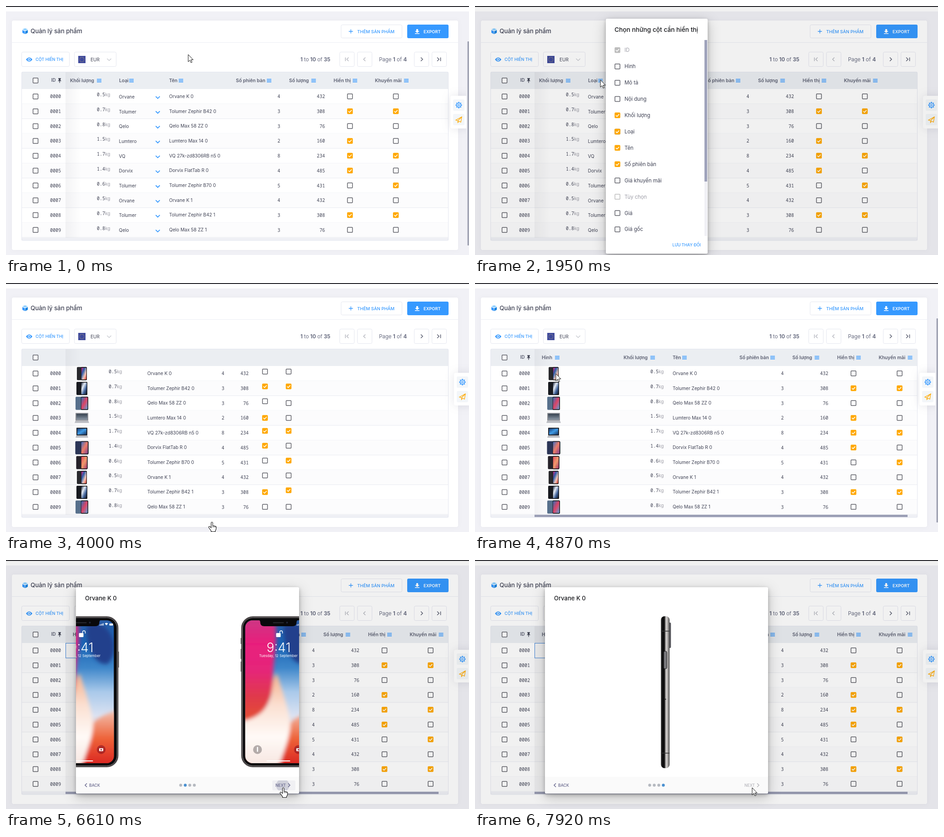
An HTML page that plays this animation: 1019x549 px, repeating every 8000 ms.

```html
<!DOCTYPE html>
<html lang="vi">
<head>
<meta charset="utf-8">
<title>Quản lý sản phẩm</title>
<style>
html, body { margin: 0; width: 100%; height: 100%; overflow: hidden; background: #f1f1f6; }
svg { display: block; width: 100%; height: 100%; }
text { font-family: Inter, Roboto, sans-serif; fill: #3f4254; white-space: pre; }
.mono { font-family: "Noto Sans Mono", "DejaVu Sans Mono", monospace; }
.light { font-weight: 300; }
.mid { font-weight: 500; }
.bold { font-weight: 600; }
.heavy { font-weight: 700; }
.end { text-anchor: end; }
.ctr { text-anchor: middle; }
.blue { fill: #3699ff; }
.head { fill: #5a5e70; }
.soft { fill: #686c80; }
.white { fill: #fff; }
.black { fill: #0d0d0f; }
.title { fill: #17181c; }
.same { fill: currentColor; }
.dim { fill: #9c9ca6; }
.old .pic, .mix .type, .new .type, .mix .hd, .old .bar, .mix .bar { display: none; }
.mix .lag { transform: translateY(-4px); }
.card { filter: drop-shadow(0 3px 4px rgba(0, 0, 0, .24)) drop-shadow(0 7px 14px rgba(0, 0, 0, .22)); }
</style>
</head>
<body>
<svg id="stage" viewBox="0 0 1019 549" preserveAspectRatio="none"></svg>
<script>
const BLUE = '#3699ff', ORANGE = '#ffa800', INK = '#5f6068', LINE = '#e4e6ef';

const txt = (x, y, s, size = 10, cls = '') =>
  `<text x="${x}" y="${y}" font-size="${size}" class="${cls}">${s}</text>`;
const box = (x, y, w, h, fill, r = 0, more = '') =>
  `<rect x="${x}" y="${y}" width="${w}" height="${h}" rx="${r}" fill="${fill}" ${more}/>`;
const line = (d, color, w = 1.5) =>
  `<path d="${d}" fill="none" stroke="${color}" stroke-width="${w}"/>`;
const shape = (d, fill, more = '') => `<path d="${d}" fill="${fill}" ${more}/>`;
const dot = (x, y, r, fill, more = '') => `<circle cx="${x}" cy="${y}" r="${r}" fill="${fill}" ${more}/>`;
const group = (id, inner, more = '') => `<g id="${id}" ${more}>${inner}</g>`;
const grad = (id, dir, ...stops) => `<linearGradient id="${id}" ${dir}>` +
  stops.map((c, i) => `<stop offset="${i / (stops.length - 1)}" stop-color="${c}"/>`).join('') + '</linearGradient>';
const DOWN = 'x1="0" x2="0" y1="0" y2="1"', SLANT = 'x1="0" x2="1" y1="0" y2="1"', ACROSS = '';

const check = (x, y, on, color = on ? ORANGE : INK) =>
  box(x - 5.5, y - 5.5, 11, 11, on ? color : '#fff', 1.2, `stroke="${color}" stroke-width="1.5"`) +
  (on ? line(`M${x - 3.5} ${y}l2.6 2.6l4.6 -5`, '#fff', 1.6) : '');
const frame = (x, y, w, h, id = '') => box(x + .5, y + .5, w - 1, h - 1, '#fff', 3, `stroke="${LINE}" id="${id}"`);
const menu = x => line(`M${x} 161.5h10m-10 3h10m-10 3h10`, BLUE, 1.3);

// Products: weight, type, model, versions, quantity, visible, promoted, thumbnail
const products = [
  [0.5, 'Orvane', 'Orvane K', 4, 432, 0, 0, 22, '#29292d', 'wall'],
  [0.7, 'Tolumer', 'Tolumer Zephir B42', 3, 308, 1, 1, 24, '#17191f', 'cool'],
  [0.8, 'Qelo', 'Qelo Max 58 ZZ', 3, 76, 0, 0, 28, '#57708c', 'pad'],
  [1.5, 'Lumtero', 'Lumtero Max 14', 2, 160, 1, 0, 30, '#8b8d93', 'lap'],
  [1.7, 'VQ', 'VQ 27k-zd8306RB n5', 8, 234, 1, 1, 26, '#24262d', 'desk'],
  [1.4, 'Dorvix', 'Dorvix FlatTab R', 4, 485, 1, 0, 29, '#2b3557', 'dusk'],
  [0.6, 'Tolumer', 'Tolumer Zephir B70', 5, 431, 0, 1, 25, '#26222a', 'rose']
];
const rows = Array.from({ length: 10 }, (_, i) => ({ i, p: products[i % 7], y: 199.3 + 32.7 * i }));

function thumb({ p, y, i }) {
  const [w, body, skin] = p.slice(7), x = 167 - w / 2, kind = i % 7;
  if (kind == 3 || kind == 4) return box(x + 1, y - 11, w - 2, 17, body, 1) + box(x + 3, y - 9, w - 6, 13, `url(#${skin})`) +
    shape(`M${x + 1} ${y + 6}h${w - 2}l2 5h${-w - 2}z`, '#b9bbc1');
  return box(x, y - 14, w, 29, body, 2) + box(x + w * .42, y - 14, w * .58, 29, '#111', 2) +
    box(x + w * .45, y - 12.5, w * .5, 26, `url(#${skin})`, 1);
}
const tick = (x, k, lag) => r =>
  `<g class="${lag[r.i] == 1 ? 'lag' : ''}">${check(x, r.y, r.p[k])}</g>`;

// Columns: class, title, title x, menu x, offset while rebuilding, final offset, cell
const columns = [
  ['pic', 'Hình', 141, 170, 0, 6, thumb],
  ['', 'Khối lượng', 141, 200, 26, 186, r => txt(218, r.y, r.p[0].toFixed(1), 10, 'mono end') + txt(218, r.y, 'kg', 10, 'dim')],
  ['type', 'Loại', 249, 271, 0, 0, r => txt(248.5, r.y + 4.5, r.p[1]) + line(`M329.5 ${r.y}l4.5 4.5l4.5 -4.5`, BLUE, 1.8)],
  ['', 'Tên', 359, 380, -48, 76, r => txt(359, r.y + 3.5, r.p[2] + ' ' + Math.floor(r.i / 7), 10.1)],
  ['', 'Số phiên bản', 506, 574, -123, 76, r => txt(603.5, r.y + 4, r.p[3], 10, 'mono end')],
  ['', 'Số lượng', 623, 672, -168, 75.5, r => txt(702, r.y + 4, r.p[4], 10, 'mono end')],
  ['', 'Hiển thị', 721, 763, -187, 76, tick(757, 5, '1110111100')],
  ['', 'Khuyến mãi', 812, 876, -236, 76.5, tick(858, 6, '1100111110')]
];

const table = box(34, 145, 940, 372, '#fff', 3) +
  shape('M34 183V148q0-3 3-3H971q3 0 3 3V183z', '#ebeef2') +
  rows.map(r => (r.i % 2 ? box(34, r.y - 16.3, 940, 32.7, '#fcfcfd') : '') + box(34, r.y + 16, 940, 1, '#e9ebf0')).join('') +
  box(34, 511, 940, 6, '#eff0f5') + box(131, 145, 34, 366, 'url(#edge)') +
  check(65, 164.3, 0) +
  `<g class="hd">${txt(99.5, 167, 'ID', 10, 'bold head')}${shape('M115 159h6v1.5h-1v3l2 2h-3.3v4h-1.4v-4H114l2-2v-3h-1z', '#4a4d5c')}</g>` +
  rows.map(r => check(65, r.y + .2, 0) + txt(97, r.y + 4, '000' + r.i, 10, 'mono')).join('') +
  `<g clip-path="url(#cells)">` + columns.map(([cls, name, x, mx, , , cell], i) =>
    group('col' + i, `<g class="hd">${txt(x, 168, name, 10.3, 'bold head')}${menu(mx)}</g>` + rows.map(cell).join(''), `class="${cls}"`)).join('') + '</g>' +
  box(131.5, 183.5, 186, 32.5, 'none', 0, 'id="focus" stroke="#3b82d8"') +
  box(131, 511, 821, 5, '#9a9eb5', 0, 'class="bar"') +
  box(34.5, 145.5, 939, 371.5, 'none', 3, `stroke="${LINE}"`);

const stars = Array.from({ length: 12 }, (_, i) =>
  dot(167 + 5 * Math.sin(i * Math.PI / 6), 118 - 5 * Math.cos(i * Math.PI / 6), .6, '#d9c36a')).join('');
const pager = (x, d, c) => frame(x, 101, 33, 33) + line(d, c, 1.5);
const strong = s => `<tspan class="heavy">${s}</tspan>`;

const page = box(0, 0, 1019, 549, '#f1f1f6') + box(0, 0, 1019, 12, '#fff') + box(0, 0, 1019, 2, '#202025') +
  box(13, 32, 982, 506, '#fff', 4, 'style="filter:drop-shadow(0 0 4px rgba(80,80,110,.06))"') + box(13, 80, 982, 1, '#ebedf3') +
  shape('M42 49l6 2.6l-6 2.6l-6-2.6z', '#8fd0ff') + shape('M36 53l5.6 2.4v6.6L36 59z', BLUE) + shape('M48 53l-5.6 2.4v6.6L48 59z', '#1b84e0') +
  txt(54, 59.5, 'Quản lý sản phẩm', 13.3, 'mid') +
  frame(737, 41, 135, 30) + line('M754.5 56h9m-4.5-4.5v9', BLUE, 1.3) + txt(773, 59.5, 'THÊM SẢN PHẨM', 9.6, 'mid blue') +
  box(883, 41, 91, 30, BLUE, 3) + shape('M903 51h4v4h3l-5 4.6l-5-4.6h3zM900 60h10v1.5h-10z', '#fff') + txt(919, 59.5, 'EXPORT', 9.3, 'bold white') +
  frame(34, 101, 106, 33, 'pickBtn') + shape('M44 118q7-9 14 0q-7 9-14 0z', BLUE) + dot(51, 118, 3, '#fff') + dot(51, 118, 1.8, BLUE) +
  txt(65, 121, 'CỘT HIỂN THỊ', 9.1, 'mid blue') +
  frame(150, 101, 93, 33) + box(159, 110, 16, 16, '#3f4a9c') + stars + txt(186, 121.5, 'EUR', 10) + line('M222.5 116l4.5 4.5l4.5-4.5', '#c3c5cc', 1.2) +
  txt(648, 121.5, `${strong(1)} to ${strong(10)} of ${strong(35)}`, 11.3, 'soft') +
  txt(821, 121.5, `Page ${strong(1)} of ${strong(4)}`, 11.5, 'soft') +
  pager(734, 'M747 113.5v8m7-8l-4 4l4 4', '#b5b7bf') + pager(773, 'M791 113.5l-4 4l4 4', '#b5b7bf') +
  pager(898, 'M913 113.5l4 4l-4 4', '#5a5e70') + pager(937, 'M949 113.5l4 4l-4 4m7.5-8v8', '#5a5e70') + table;

const gear = Array.from({ length: 8 }, (_, i) => `<path d="M996.5 211.5v2.5" stroke="${BLUE}" stroke-width="2.6" transform="rotate(${i * 45} 996.5 218.5)"/>`).join('') +
  dot(996.5, 218.5, 4.6, '#f3f6f9', `stroke="${BLUE}" stroke-width="1.3"`) + dot(996.5, 218.5, 1.9, 'none', `stroke="${BLUE}" stroke-width="1.2"`);
const side = group('side', box(978, 198, 41, 72, '#fff', 4, 'style="filter:drop-shadow(0 0 10px rgba(70,70,100,.14))"') +
  box(984, 206, 25, 25, '#f3f6f9', 3) + box(984, 238, 25, 25, '#f3f6f9', 3) + gear +
  shape('M990 251.5l13-7l-2 11.5l-4-2l-2.5 3v-4z', 'none', `stroke="${ORANGE}" stroke-width="1.3"`) + line('M1003 244.5l-8.5 8.5', ORANGE, 1.2)) +
  group('scroll', box(1013, 12, 6, 537, '#f1f1f6') + box(1015.5, 78, 3.5, 450, '#a3a6b5', 1));

const options = ['ID', 'Hình', 'Mô tả', 'Nội dung', 'Khối lượng', 'Loại', 'Tên', 'Số phiên bản', 'Giá khuyến mãi', 'Tùy chọn', 'Giá', 'Giá gốc'];
const chooser = box(288, 28, 224, 518, '#fff', 3, 'class="card"') + txt(307, 56.5, 'Chọn những cột cần hiển thị', 13.7, 'mid title') +
  options.map((name, i) => {
    const y = 97.3 + 35.92 * i, off = i == 0 || i == 9, on = i == 0 || (i > 3 && i < 8);
    let mark = check(313.5, y, on, off ? '#bdbdbd' : undefined);
    if (i == 1 || i == 5) mark = check(313.5, y, 0) + group(i == 1 ? 'added' : 'removed', check(313.5, y, 1));
    return mark + txt(329, y + 4, name, 11.3, off ? 'dim' : '');
  }).join('') +
  box(505, 75, 6, 432, '#f0f0f5') + box(505, 75, 6, 312, '#9fa3bb') + txt(434.5, 530, 'LƯU THAY ĐỔI', 8.8, 'mid blue');

// Phone views, drawn from their own top left corner
const front = box(-1, 48, 2, 13, '#444') + box(-1, 72, 2, 22, '#444') + box(-1, 100, 2, 22, '#444') + box(163, 78, 2, 35, '#444') +
  box(.8, .8, 162.4, 331.4, '#09090b', 25, 'stroke="#6d6768" stroke-width="1.6"') + box(3, 3, 158, 327, '#0b0b0d', 23, 'stroke="#b5adac"') +
  `<g clip-path="url(#screen)">${box(9, 9, 145, 315, 'url(#sky)')}<g filter="url(#blur)">` +
  shape('M95 20C150 0 170 80 140 105C110 110 90 60 95 20z', '#243f8c') +
  shape('M0 0H72C84 50 70 90 70 140C68 200 40 228 0 238z', 'url(#pink)') +
  shape('M100 245C125 215 145 215 165 205V335H85z', 'url(#fire)') +
  shape('M0 335V232C30 226 58 212 67 172C69 145 76 120 80 130C90 165 104 200 108 235C108 270 92 300 82 335z', 'url(#glow)') + '</g></g>' +
  shape('M38 8h88q-4 1-4 5q0 9-9 9H51q-9 0-9-9q0-4-4-5z', '#09090b') + box(70, 13, 24, 2.5, '#25262b', 1) + dot(101, 14, 2, '#20263a') +
  box(77, 37, 10, 9, '#fff', 1.5) + line('M85 38v-3a3 3 0 0 1 6 0v3', '#fff', 1.4) +
  line('M123 20.5v-2m2.5 2v-3m2.5 3v-4m2.5 4v-5', '#fff', 1.4) + shape('M134 16q3.5-3 7 0l-3.5 4z', '#fff') + box(144, 16, 8, 4.5, '#fff', 1) +
  txt(82.5, 78.5, '9:41', 28, 'white ctr light') + txt(82, 90, 'Tuesday, 12 September', 7.7, 'white ctr') +
  dot(36, 294, 9.7, '#8d8585', 'opacity=".65"') + box(34.7, 288, 2.6, 11, '#fff', 1) +
  dot(126, 294, 9.7, '#8a1420', 'opacity=".6"') + box(121.5, 291, 9, 6.5, '#fff', 1.2) + dot(126, 294.2, 1.8, '#b43a40') +
  box(56, 318, 52, 2, '#fff', 1);
const back = box(.8, .8, 162.4, 331.4, 'url(#shell)', 25, 'stroke="#1d1d20" stroke-width="1.6"') +
  box(2.8, 2.8, 158.4, 327.4, 'none', 23, 'stroke="#a9a6a8"') +
  box(14, 15, 26, 56, '#121214', 13, 'stroke="#77777b" stroke-width=".8"') + dot(27, 29, 8, '#29292e') + dot(27, 29, 3.5, '#090a12') +
  dot(27, 43, 2.6, '#efe4c8') + dot(27, 57, 8, '#29292e') + dot(27, 57, 3.5, '#3a1c22') +
  dot(80, 105, 13, '#8d8d92') + txt(66, 254, 'Orvane', 10, 'mid black');
const profile = box(17, 14, 5, 56, '#55555a', 2) + box(0, 0, 19, 335, 'url(#steel)', 8) +
  box(6, 77, 7, 39, '#77777b', 3, 'stroke="#1c1c1e"') + dot(10, 183, 1.3, '#222') +
  box(0, 32, 19, 1.5, '#333') + box(0, 301, 19, 1.5, '#333');
const PITCH = 491;
const put = (id, slide, x) => `<use href="#${id}" x="${x + slide * PITCH}" y="124"/>`;

const gallery = box(154, 60, 491, 455, '#fff', 3, 'class="card"') + txt(174, 88.5, 'Orvane K 0', 13, 'mid title') +
  `<g clip-path="url(#view)">${group('slides', put('back', 0, 293) + put('front', 0, 374) + put('front', 1, 317) + put('back', 2, 318) + put('profile', 3, 390))}</g>` +
  shape('M154 478H645V512q0 3-3 3H157q-3 0-3-3z', '#fafafa') +
  box(586, 486, 51, 22, '#f0f0f3', 3, 'id="hover"') + `<g clip-path="url(#nextClip)">${dot(609, 497, 5, '#8084a0', 'id="ripple"')}</g>` +
  group('prev', line('M178 492.5l-4 4l4 4', 'currentColor') + txt(183, 499.8, 'BACK', 8.7, 'mid same')) +
  group('next', txt(593, 499.8, 'NEXT', 8.6, 'mid same') + line('M621 492.5l4 4l-4 4', 'currentColor')) +
  [0, 1, 2, 3].map(i => dot(384.5 + 10 * i, 496.5, 3.2, '#b5b9c0', `id="dot${i}"`)).join('');

const clip = (id, x, y, w, h, r = 0) => `<clipPath id="${id}">${box(x, y, w, h, '#000', r)}</clipPath>`;
const defs = '<defs>' + clip('cells', 131, 145, 843, 366) + clip('view', 154, 100, 491, 378) + clip('nextClip', 586, 486, 51, 22, 3) + clip('screen', 9, 9, 145, 315, 16) +
  '<filter id="blur" x="-20%" y="-20%" width="140%" height="140%"><feGaussianBlur stdDeviation="4"/></filter>' +
  grad('edge', ACROSS, 'rgba(40,40,60,.05)', 'rgba(40,40,60,0)') +
  grad('sky', DOWN, '#2a5ea8', '#1a63b4', '#3f87ca', '#a9c9ea', '#dbe2f2', '#eeb5a5', '#d8271f') +
  grad('pink', DOWN, '#c93a86', '#e81f7c', '#e5267a', '#e03a4a', '#e4532f') + grad('fire', DOWN, '#f2c4b5', '#ee6338', '#d81e20') +
  grad('glow', DOWN, '#f3b08c', '#fbe0d2', '#fffaf7', '#f6e4de') +
  grad('shell', DOWN, '#515155', '#434347', '#2e2e31', '#29292c') + grad('steel', ACROSS, '#333', '#0b0b0c', '#111', '#d9d6d4', '#a9a6a5', '#444') +
  grad('wall', SLANT, '#d4267d', '#2c5ca8', '#f2c9bb', '#d83428') + grad('cool', SLANT, '#25304a', '#e6edf6', '#3c5f98', '#12151d') +
  grad('pad', SLANT, '#2f6cb4', '#de4466', '#5ba0d8') + grad('lap', DOWN, '#36424f', '#8a97a5') + grad('desk', SLANT, '#173c78', '#3f9be6', '#15315f') +
  grad('dusk', SLANT, '#3e6fc4', '#ee7c66', '#7a3f8f') + grad('rose', SLANT, '#e14a62', '#f09a6a', '#a2346c') +
  group('front', front) + group('back', back) + group('profile', profile) + '</defs>';

const pointer = group('arrow', shape('M0 0V16l3.7-3.5l2.5 5.5l2.4-1.1l-2.5-5.3H11z', '#fff', 'stroke="#111"')) +
  group('hand', shape('M-1.5 2q0-2 1.7-2t1.8 2v6l6 1.3q2 .6 1.8 3l-.8 4.7l-1.5 2.5v2H-1.5v-2L-6.5 12.5q-1-2 .6-2.7q1.4-.4 2.7 1.2l1.7 1.7z', '#fff', 'stroke="#111" stroke-width="1.1"') + line('M2.2 8v4m2.8-3.4v3.4m2.7-2.8v3', '#111', .8));

const stage = document.getElementById('stage');
stage.innerHTML = defs + page + side + box(0, 0, 1019, 549, '#000', 0, 'id="shade"') +
  group('chooser', chooser) + group('gallery', gallery) + group('cursor', pointer);

const $ = id => document.getElementById(id);
const set = (id, key, value) => $(id).setAttribute(key, value);
const show = (id, on) => { $(id).style.display = on ? '' : 'none'; };
const ramp = (t, from, span) => Math.min(1, Math.max(0, (t - from) / span));
const smooth = s => s * s * (3 - 2 * s);
// cubic-bezier(.35, 0, .25, 1)
function ease(x) {
  let lo = 0, hi = 1;
  for (let i = 0; i < 20; i++) {
    const s = (lo + hi) / 2, u = 1 - s;
    if (1.05 * u * u * s + .75 * u * s * s + s ** 3 < x) lo = s; else hi = s;
  }
  return smooth(lo);
}

const path = [[0, 401, 107], [450, 401, 107], [920, 92, 131], [1400, 92, 131], [1880, 264, 169], [1950, 276, 163], [2280, 328, 132],
  [2480, 328, 132], [2760, 330, 273], [2880, 330, 273], [3230, 453, 527], [4000, 453, 527], [4080, 448, 520], [4790, 178, 200],
  [5750, 178, 200], [6330, 610, 502], [8000, 610, 502]];
const clicks = [6414, 7040, 7538];

function popup(id, k, cx, cy) {
  show(id, k > 0);
  set(id, 'opacity', k);
  const s = .8 + .2 * k;
  set(id, 'transform', `translate(${cx * (1 - s)} ${cy * (1 - s)}) scale(${s})`);
}

function draw(t) {
  const pick = smooth(ramp(t, 1180, 150)) * (1 - ramp(t, 3380, 80)), view = smooth(ramp(t, 5120, 150));
  popup('chooser', pick, 400, 287);
  popup('gallery', view, 400, 287);
  set('shade', 'opacity', .055 * Math.max(pick, view));
  show('added', t >= 2430);
  show('removed', t < 2840);
  set('pickBtn', 'fill', t > 800 && t < 1200 ? '#f3f6f9' : '#fff');

  const state = t < 3540 ? 'old' : t < 4080 ? 'mix' : 'new', move = smooth(ramp(t, 4080, 220));
  stage.setAttribute('class', state);
  columns.forEach(([, , , , mid, end], i) =>
    set('col' + i, 'transform', `translate(${state == 'old' ? 0 : mid + (end - mid) * move} 0)`));
  show('focus', t >= 5000);

  const locked = (t >= 1180 && t < 4060) || t >= 5120;
  set('side', 'transform', `translate(${locked ? 8 : 0} 0)`);
  show('scroll', !locked);

  const shift = clicks.reduce((sum, c) => sum + ease(ramp(t, c, 500)), 0);
  set('slides', 'transform', `translate(${-PITCH * shift} 0)`);
  const active = clicks.filter(c => t >= c).length, last = active == 3;
  for (let i = 0; i < 4; i++) set('dot' + i, 'fill', i == active ? (i ? '#4a90d0' : '#2f95f0') : '#b5b9c0');
  $('prev').style.color = active ? '#66668c' : '#acacb2';
  $('next').style.color = last ? '#b4b4ba' : '#66668c';
  show('hover', t >= 6300 && !last);
  const since = active ? t - clicks[active - 1] : 1e4;
  set('ripple', 'r', 5 + 12 * ramp(since, 0, 250));
  set('ripple', 'opacity', last ? 0 : .3 * (1 - ramp(since, 300, 200)));

  const n = path.findIndex(p => p[0] > t), [t0, x0, y0] = path[n - 1], [t1, x1, y1] = path[n];
  const k = smooth((t - t0) / (t1 - t0)), x = x0 + (x1 - x0) * k, y = y0 + (y1 - y0) * k;
  set('cursor', 'transform', `translate(${x} ${y})`);
  const hand = (t > 800 && t < 1250) || (t > 2200 && t < 2960) || (t > 3150 && t < 4080) || (t > 6270 && !last);
  show('hand', hand);
  show('arrow', !hand);
}

const start = performance.now();
function loop() {
  draw(Math.max(0, performance.now() - start) % 8000);
  requestAnimationFrame(loop);
}
loop();
</script>
</body>
</html>
```
